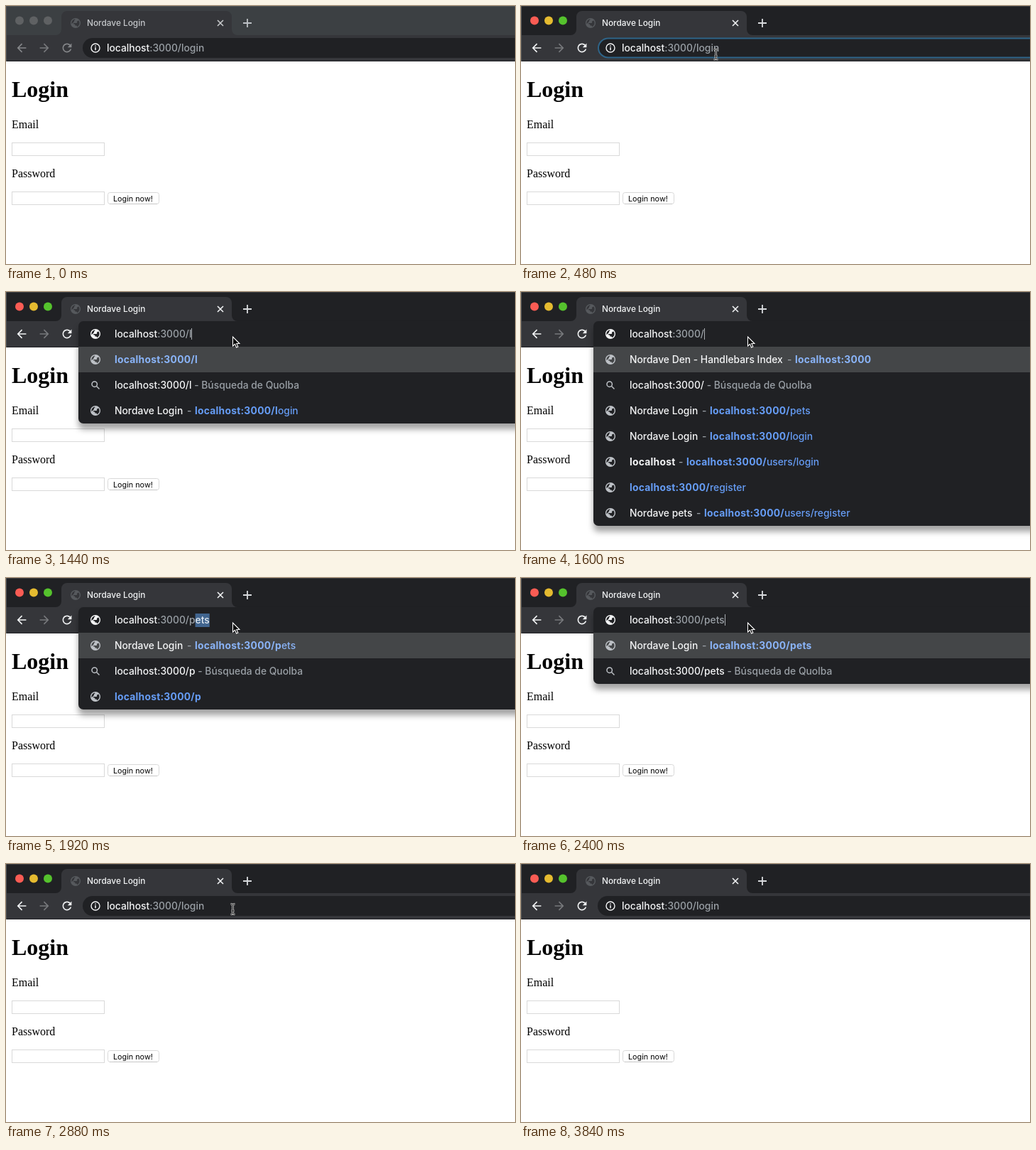
These frames come from a looping animation (717 px wide and 363 px high, 4320 ms). An HTML page:

```html
<!DOCTYPE html>
<html lang="es">
<head>
<meta charset="utf-8">
<title>Login</title>
<style>
html, body { margin: 0; width: 100%; height: 100%; overflow: hidden; background: #fff; }
svg { display: block; width: 717px; height: 363px; }
text { white-space: pre; font: 500 13.85px Inter, Roboto, sans-serif; }
text.page { font: 16px "Liberation Serif", serif; }
text.page.b { font-size: 32px; letter-spacing: 0; }
.b { font-weight: 700 !important; letter-spacing: .25px; }
.popup { filter: drop-shadow(0 8px 4px rgba(0, 0, 0, .36)); }
</style>
</head>
<body>
<svg viewBox="0 0 717 363">
  <defs>
    <path id="globe" transform="scale(.7 -.7) translate(-12 -12)" d="M12 2C6.48 2 2 6.48 2 12s4.48 10 10 10 10-4.48 10-10S17.52 2 12 2zm-1 17.93c-3.95-.49-7-3.85-7-7.93 0-.62.08-1.21.21-1.79L9 15v1c0 1.1.9 2 2 2v1.93zm6.9-2.54c-.26-.81-1-1.39-1.9-1.39h-1v-3c0-.55-.45-1-1-1H8v-2h2c.55 0 1-.45 1-1V7h2c1.1 0 2-.9 2-2v-.41c2.93 1.19 5 4.06 5 7.41 0 2.08-.8 3.97-2.1 5.39z"/>
    <path id="back" transform="scale(.8) translate(-12 -12)" d="M20 11H7.83l5.59-5.59L12 4l-8 8 8 8 1.41-1.41L7.83 13H20z"/>
    <path id="reload" transform="scale(.8) translate(-12 -12)" d="M17.65 6.35C16.2 4.9 14.21 4 12 4c-4.42 0-7.99 3.58-7.99 8s3.57 8 7.99 8c3.73 0 6.84-2.55 7.73-6h-2.08c-.82 2.33-3.04 4-5.65 4-3.31 0-6-2.69-6-6s2.69-6 6-6c1.66 0 3.14.69 4.22 1.78L13 11h7V4z"/>
    <g id="search" fill="none" stroke="#bdc1c6" stroke-width="1.5"><circle cx="-1.3" cy="-1.3" r="3.7"/><path d="M1.5 1.5 5.5 5.5"/></g>
    <g id="arrow"><path d="M.5.5V13.6l3-2.8 2.1 4.7 2.2-1-2-4.5h4.1z" fill="#000" stroke="#fff" stroke-width="1.1"/></g>
    <path id="bar" d="M-3-7.2Q0-7.2 0-5V5Q0 7.2-3 7.2M3-7.2Q0-7.2 0-5M0 5Q0 7.2 3 7.2M-2 2.4H2"/>
    <g id="beam" fill="none"><use href="#bar" stroke="#c9c9c9" stroke-width="2.6"/><use href="#bar" stroke="#222" stroke-width="1"/></g>
  </defs>
  <rect width="717" height="363" fill="#fff"/>
  <g>
    <text class="page b" x="8" y="128">Login</text>
    <text class="page" x="8" y="172">Email</text>
    <text class="page" x="8" y="241">Password</text>
    <g fill="#fff" stroke="#d9d9d9">
      <rect x="8.5" y="192.5" width="130" height="18"/>
      <rect x="8.5" y="261.5" width="130" height="18"/>
      <rect x="143.5" y="262.5" width="72" height="16" rx="3"/>
    </g>
    <path d="M146 278.5H213" stroke="#c8c8c8"/>
    <text x="151" y="275" style="font-size:10.8px;font-weight:400">Login now!</text>
  </g>
  <g id="frame"></g>
  <g id="field"></g>
  <g id="popup" class="popup"></g>
  <use id="cursor"/>
</svg>
<script>
const LOOP = 4320;
const HOST = 'localhost', BASE = HOST + ':3000/';
const LIGHT = '#f4f5f6', DIM = '#9aa0a6';
const $ = id => document.getElementById(id);
const use = (id, x, y, fill = '') => `<g transform="translate(${x} ${y})" fill="${fill}"><use href="#${id}"/></g>`;
const span = (s, fill, cls = '') => `<tspan fill="${fill}" class="${cls}">${s}</tspan>`;
const text = (x, y, body, style = '') => `<text x="${x}" y="${y}" style="${style}">${body}</text>`;

// Suggestions: page = title + address, ask = web search, link = address only
const page = (title, x, bold, rest = '', cls = '') => ({ title, x, bold, rest, cls });
const ask = query => ({ query });
const link = (bold, rest = '') => page('', 153, bold, rest);
const SITE = 'Nordave Login';
const typing = n => {
  const word = 'pets', typed = BASE + word.slice(0, n);
  return {
    typed, rest: word.slice(n),
    rows: [page(SITE, 266, typed, word.slice(n)), ask(typed), ...(n < 4 ? [link(typed)] : [])]
  };
};
const all = [
  page('Nordave Den - Handlebars Index', 386, HOST + ':3000'),
  ask(BASE),
  page(SITE, 266, BASE, 'pets'),
  page(SITE, 266, BASE, 'login'),
  page(HOST, 233, BASE, 'users/login', 'b'),
  link(BASE, 'register'),
  page('Nordave pets', 258, BASE, 'users/register')
];
const first = [link(BASE + 'l'), ask(BASE + 'l'), page(SITE, 266, BASE + 'l', 'ogin')];

const login = { typed: BASE + 'login', rest: '' };
const focus = { ...login, ring: true };
const picked = { typed: BASE + 'l', rest: 'ogin', ring: true };
const point = ['arrow', 319, 62.5], beam = ['beam', 319.5, 63.5];

// [start ms, state, cursor: shape, x, y, scale]
const steps = [
  [0, { ...login, asleep: true }],
  [160, { ...login, asleep: true }, ['arrow', 275.5, 103]],
  [320, { ...login, asleep: true }, ['arrow', 270.5, 82]],
  [480, focus, ['beam', 274.5, 68]],
  [640, focus, ['beam', 262, 65]],
  [800, focus, ['beam', 252.5, 63]],
  [960, picked, ['beam', 243.5, 62.5, 2.1]],
  [1120, picked, beam],
  [1440, { typed: BASE + 'l', rest: '', rows: first }, point],
  [1600, { typed: BASE, rest: '', rows: all }, point],
  [1920, typing(1), point],
  [2080, typing(2), point],
  [2240, typing(3), point],
  [2400, typing(4), point],
  [2720, { ...typing(4), fade: .5 }, point],
  [2880, login, beam],
  [3520, login, ['beam', 163, 63]],
  [3680, login, ['arrow', 495.5, 346]],
  [3840, login]
];

function drawFrame({ asleep }) {
  const icon = asleep ? '#85878a' : '#f1f3f4';
  const lights = asleep ? Array(3).fill('#5f6163') : ['#fa5c54', '#e5bb30', '#55c22d'];
  $('frame').innerHTML = `
    <rect width="717" height="78" fill="${asleep ? '#3c4043' : '#202124'}"/>
    <path d="M0 .5H717" stroke="${asleep ? '#505355' : '#3b3c3e'}"/>
    <path d="M0 41H70a8 8 0 0 0 8-8V15a8 8 0 0 1 8-8H310a8 8 0 0 1 8 8V33a8 8 0 0 0 8 8H717V77H0z" fill="#35363a"/>
    <path d="M0 77.5H717" stroke="#222326"/>
    <path d="M.5 0V78" stroke="#505255"/>
    ${lights.map((c, i) => `<circle cx="${19 + 20 * i}" cy="20.5" r="6" fill="${c}"/>`).join('')}
    ${use('globe', 98, 24, '#56595d')}
    ${text(114, 28, span(SITE, asleep ? '#c4c7ca' : '#f1f3f4'), 'font-size:11.85px')}
    <path d="M298 20l8 8m0-8l-8 8" stroke="${asleep ? '#c8cacc' : '#f1f3f4'}" stroke-width="1.6"/>
    <path d="M334 24h12m-6-6v12" stroke="${asleep ? '#bdc1c6' : '#d8dadd'}" stroke-width="1.8"/>
    ${use('back', 22, 59, icon)}
    <g transform="translate(54 59) scale(-1 1)" fill="#77797c"><use href="#back"/></g>
    ${use('reload', 86, 59, icon)}`;
}

// Address text with its selection or caret, placed by the measured text width
function address(el, x, { typed, rest }, caret) {
  el.insertAdjacentHTML('beforeend', text(x, 64,
    span(HOST, LIGHT) + span(typed.slice(HOST.length), DIM) + span(rest, '#e4ebf3')));
  const t = el.lastElementChild;
  const at = x + t.getSubStringLength(0, typed.length);
  if (rest) {
    const w = t.getSubStringLength(typed.length, rest.length);
    t.insertAdjacentHTML('beforebegin', `<rect x="${at}" y="50" width="${w}" height="19" fill="#41658f"/>`);
  } else if (caret) {
    el.insertAdjacentHTML('beforeend', `<rect x="${Math.round(at)}" y="51" width="1" height="16" fill="#a9adb2"/>`);
  }
}

function drawField(s) {
  const ring = s.ring ? 'stroke="#2e6488" stroke-width="2"' : '';
  const inset = s.ring ? 1 : 0;
  $('field').innerHTML = `
    <rect x="${108 + inset}" y="${45 + inset / 2}" width="640" height="${28 - inset}" rx="14" fill="#202124" ${ring}/>
    <circle cx="126" cy="59" r="6" fill="none" stroke="${LIGHT}" stroke-width="1.4"/>
    <path d="M126 58v4.2M126 55.4v1.5" stroke="${LIGHT}" stroke-width="1.5"/>`;
  address($('field'), 142, s, false);
}

function row(r, i) {
  const mid = 95 + 36 * i, y = mid + 5;
  if (r.query) {
    return use('search', 126, mid) + text(153, y, span(r.query, LIGHT) + span(' - Búsqueda de Quolba', DIM));
  }
  const blue = i ? '#669df6' : '#8ab4f8';
  const title = r.title && text(153, y, span(r.title, LIGHT, r.cls)) + text(r.x - 11, y, span('-', DIM));
  return use('globe', 126, mid, '#bdc1c6') + title + text(r.x, y, span(r.bold, blue, 'b') + span(r.rest, blue));
}

function drawPopup(s) {
  const el = $('popup');
  el.innerHTML = '';
  el.style.opacity = s.fade || 1;
  if (!s.rows) return;
  el.innerHTML = `
    <rect x="102" y="41" width="660" height="${36 + 36 * s.rows.length}" rx="7" fill="#202124"/>
    <rect x="102" y="77" width="660" height="36" fill="#444648"/>
    ${use('globe', 126, 59, LIGHT)}
    ${s.rows.map(row).join('')}`;
  address(el, 153, s, true);
}

function drawCursor(c) {
  const el = $('cursor');
  el.style.display = c ? '' : 'none';
  if (!c) return;
  const [shape, x, y, k = 1] = c;
  el.setAttribute('href', '#' + shape);
  el.setAttribute('transform', `translate(${x} ${y}) scale(${k})`);
}

let shown;
const start = performance.now();
function tick() {
  const t = (performance.now() - start) % LOOP;
  const step = steps.findLast(s => s[0] <= t) || steps[0];
  if (step !== shown) {
    shown = step;
    const [, state, cursor] = step;
    drawFrame(state);
    drawField(state);
    drawPopup(state);
    drawCursor(cursor);
  }
  requestAnimationFrame(tick);
}
tick();
</script>
</body>
</html>
```
